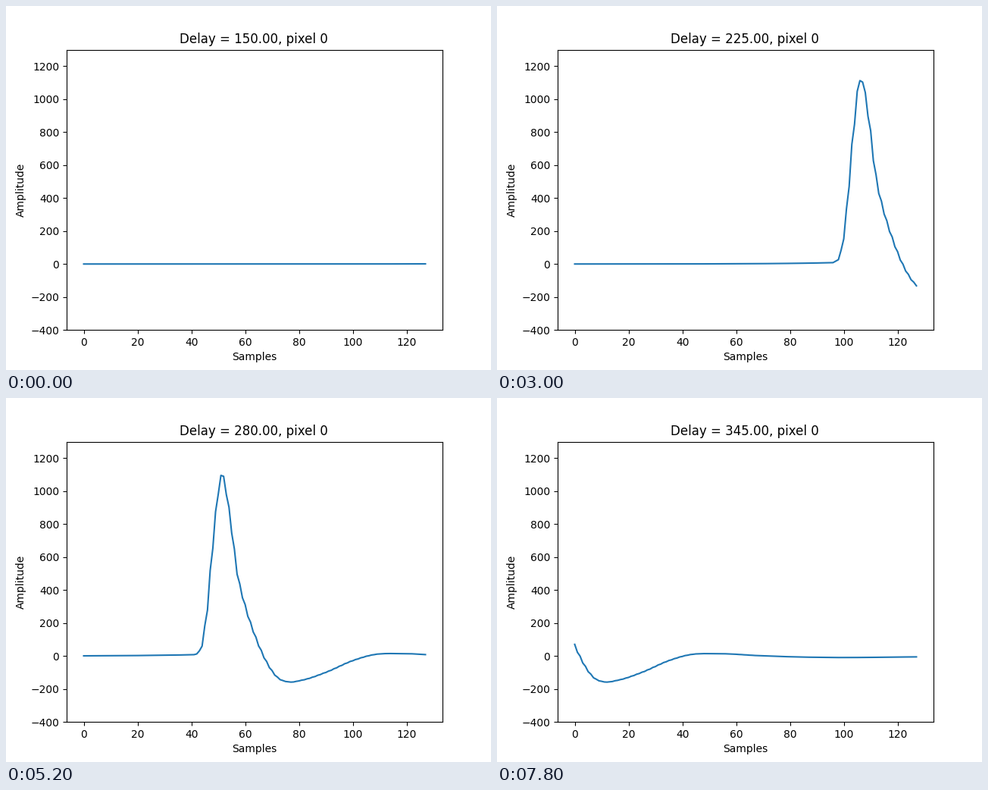
A matplotlib script that plays this animation: 640x480 px, repeating every 8000 ms.

```python
import numpy as np
import matplotlib.pyplot as plt
from matplotlib.animation import FuncAnimation

FRAMES, INTERVAL = 40, 200
FIRST_DELAY, DELAY_STEP = 150, 5
N_SAMPLES = 128

# Key points (time, amplitude) of the pulse, its undershoot and ringing.
KEYS = np.array([
    (320, 8), (322, 15), (324, 72), (326, 310), (328, 700), (331.3, 1130),
    (334, 912), (337, 525), (340, 312), (343, 157), (348, -38), (352, -130),
    (356, -157), (361, -147), (370, -99), (380, -28), (388, 9), (398, 15),
    (415, 1), (435, -8), (475, -5),
])
KEY_T, KEY_V = KEYS.T
SLOPE = np.gradient(KEY_V, KEY_T)

samples = np.arange(N_SAMPLES)
# Odd samples are taken slightly late, which gives the fine staircase.
skew = np.where(samples % 2, 0.15, -0.15)


def smooth_curve(t):
    """Cubic Hermite curve through the key points."""
    t = np.clip(t, KEY_T[0], KEY_T[-1])
    i = np.clip(np.searchsorted(KEY_T, t) - 1, 0, len(KEY_T) - 2)
    h = KEY_T[i + 1] - KEY_T[i]
    s = (t - KEY_T[i]) / h
    blend = s * s * (3 - 2 * s)
    return (KEY_V[i] * (1 - blend) + KEY_V[i + 1] * blend
            + h * s * (1 - s) * (SLOPE[i] * (1 - s) - SLOPE[i + 1] * s))


def response(delay):
    t = samples + delay + skew
    lead = np.minimum(t - KEY_T[0], 0)
    wave = smooth_curve(t) * np.exp(lead / 20)
    gain = 1 - 0.0005 * (delay - 225)
    return np.where(wave > 0, wave * gain, wave)


fig, ax = plt.subplots(figsize=(6.4, 4.8), dpi=100)
line, = ax.plot(samples, response(FIRST_DELAY))
title = ax.set_title("", x=0.498)
ax.set_xlabel("Samples")
ax.set_ylabel("Amplitude")
ax.set_ylim(-400, 1300)


def update(frame):
    delay = FIRST_DELAY + DELAY_STEP * frame
    line.set_ydata(response(delay))
    title.set_text(f"Delay = {delay:.2f}, pixel 0")
    return line, title


anim = FuncAnimation(fig, update, frames=FRAMES, interval=INTERVAL,
                     repeat=True, repeat_delay=0, blit=False)
plt.show()
```
